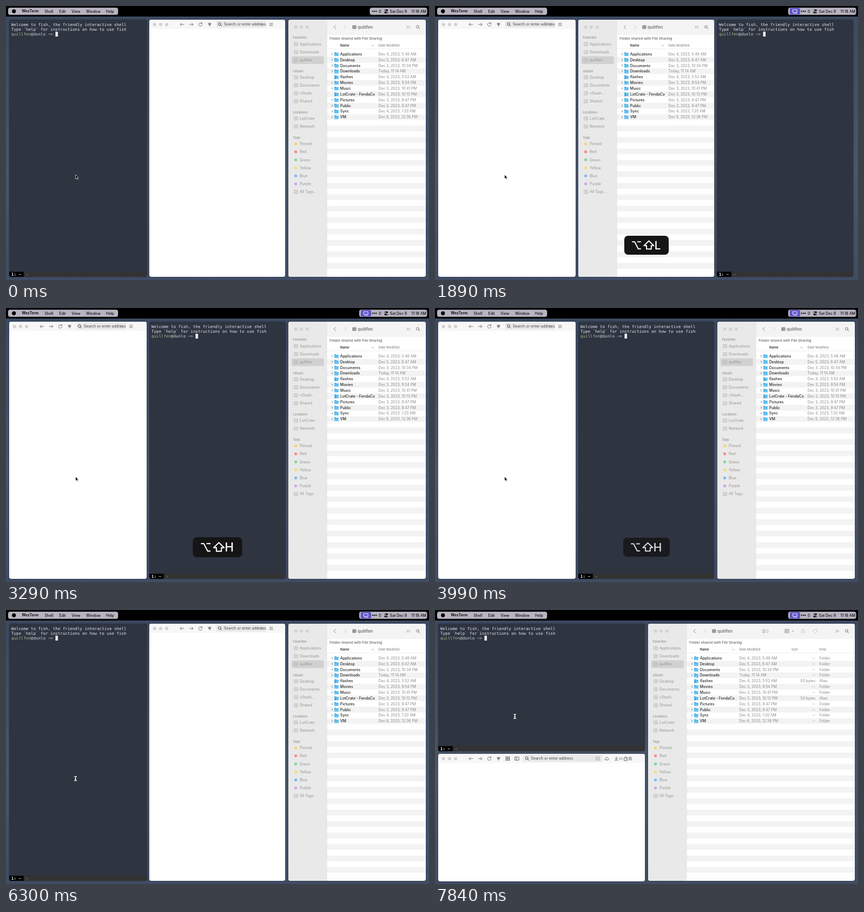
Recreate the animation shown at these times as an HTML page. Size 800 by 520 pixels, loop 8000 ms.

```html
<!DOCTYPE html>
<html lang="en">
<head>
<meta charset="utf-8">
<title>Tiling windows</title>
<style>
html, body { margin: 0; width: 800px; height: 520px; overflow: hidden; }
body { position: relative; background: linear-gradient(#3c4961, #4a566b 60%, #414d65); }
svg { display: block; position: absolute; left: 0; top: 0; }
text { font-family: Inter, "Open Sans", sans-serif; white-space: pre; }
.mono text { font-family: "DejaVu Sans Mono", "Noto Sans Mono", monospace; }
.win { position: absolute; overflow: hidden; border-radius: 4px; box-shadow: 0 0 3px #1a223388; }
#term { background: #2e3440; }
#web, #files { background: #fff; }
.line { fill: none; stroke-width: .9; stroke-linecap: round; stroke-linejoin: round; }
</style>
</head>
<body>
<div class="win" id="files"></div>
<div class="win" id="web"></div>
<div class="win mono" id="term"></div>
<div id="top"></div>
<script>
const $ = id => document.getElementById(id);
const svg = body => `<svg width="800" height="520">${body}</svg>`;
const rect = (x, y, w, h, fill, r = 0) =>
  `<rect x="${x}" y="${y}" width="${w}" height="${h}" rx="${r}" fill="${fill}"/>`;
const dot = (x, y, r, fill) => `<circle cx="${x}" cy="${y}" r="${r}" fill="${fill}"/>`;
const line = (x, y, d, color = '#777') =>
  `<path class="line" transform="translate(${x} ${y})" d="${d}" stroke="${color}"/>`;
// y is the middle of the text line
const text = (x, y, s, size = 7, fill = '#222', weight = 400, anchor = 'start') =>
  `<text x="${x}" y="${y + size * .36}" font-size="${size}" fill="${fill}" font-weight="${weight}" text-anchor="${anchor}">${s}</text>`;
const lights = (xs, y) => xs.map(x => dot(x, y, 3.1, '#d2d2d2')).join('');

const ICON = {
  left: 'M3.5 0H-3.5M-.8 -2.7L-3.5 0L-.8 2.7',
  right: 'M-3.5 0H3.5M.8 -2.7L3.5 0L.8 2.7',
  reload: 'M2.8 -1.8A3.3 3.3 0 1 0 3.3 .5M3 -3.6V-1.5H.9',
  leaf: 'M0 3.5V-1M-3 -2.5L0 0L3 -2.5M-2.5 -.5H2.5M-1 -3L0 -1L1 -3M-1.5 1H1.5',
  search: 'M1.6 1.6L3.5 3.5M2 -.5A2.5 2.5 0 1 1 -3 -.5A2.5 2.5 0 1 1 2 -.5',
  more: 'M-3 -2.3L-.8 0L-3 2.3M.6 -2.3L2.8 0L.6 2.3',
  menu: 'M-3 -2.3H3M-3 0H3M-3 2.3H3',
  panel: 'M-3.7 -3H3.7V3H-3.7ZM-1 -3V3',
  box: 'M-3.2 -3H3.2V3H-3.2ZM-1.5 -1H1.5M-1.5 1H1.5',
  cloud: 'M-2.5 2.5H2.5A1.7 1.7 0 0 0 2.5 -.5A2.6 2.6 0 0 0 -2.5 -.5A1.6 1.6 0 0 0 -2.5 2.5',
  down: 'M0 -3V1.2M-2 -.7L0 1.2L2 -.7M-3 3H3',
  piece: 'M-3 3.3V-1.5H-1V-3.2H1V-1.5H3V0H1.8V1.7H3V3.3Z',
  back: 'M1.6 -3.4L-1.8 0L1.6 3.4',
  fwd: 'M-1.6 -3.4L1.8 0L-1.6 3.4',
  chev: 'M-.8 -1.7L.9 0L-.8 1.7',
  caret: 'M-1.6 .8L0 -.8L1.6 .8',
  list: 'M-5 -2.5H0M-5 0H0M-5 2.5H0M3 -1L4.4 -2.6L5.8 -1M3 1L4.4 2.6L5.8 1',
  share: 'M-2 -1H-3V3.5H3V-1H2M0 1V-4M-1.6 -2.4L0 -4L1.6 -2.4',
  tag: 'M-4 0L-1 -3H3.5V1L.5 4ZM2 -1.5V-1.4'
};
const icon = (name, x, y, color) => line(x, y, ICON[name], color);
const grid = (x, y, fill) => [0, 1, 2].flatMap(i => [0, 1, 2].map(j =>
  rect(x - 4 + i * 3, y - 3.8 + j * 2.8, 2, 1.9, fill))).join('');

// Terminal
$('term').innerHTML = svg(
  ['Welcome to fish, the friendly interactive shell', 'Type `help` for instructions on how to use fish']
    .map((s, i) => text(4, 9.2 + 9 * i, s, 7.69, '#e5e9f0')).join('') +
  text(4, 27.4, '<tspan fill="#a3be8c">quillfen</tspan>@dunlo ~&gt;', 7.69, '#d0d6de') +
  rect(87.5, 22.8, 4.7, 9.2, '#eceff4') +
  `<g id="tabs">${rect(0, -9.7, 800, 10, '#333')}${rect(0, -9.7, 27.5, 10, '#000')}
  ${text(4, -4.8, '1: ~', 7.69, '#eee', 700)}${text(32, -4.8, '+', 7, '#777')}</g>`);

// Browser
const address = (x, w) => `<svg x="${x}" y="2" width="${w}" height="13">${rect(0, 0, w, 13, '#e9e9eb', 2)}
  ${icon('search', 7, 6.7, '#333')}${text(14.5, 6.8, 'Search or enter address', 7, '#444')}</svg>`;
$('web').innerHTML = svg(
  rect(0, 0, 800, 17.5, '#f7f7f8') + lights([10, 21.5, 33], 9.2) +
  ['left', 'right', 'reload', 'leaf'].map((n, i) => icon(n, 62 + 17.4 * i, 9, '#666')).join('') +
  `<g id="webSmall">${address(126.5, 94.5)}${icon('more', 212.5, 9)}${icon('menu', 230.5, 9)}</g>
  <g id="webWide">${grid(131.5, 9, '#444')}${icon('panel', 149, 9, '#555')}${address(161, 150)}
  ${['box', 'cloud', 'down', 'more', 'piece', 'menu'].map((n, i) =>
    icon(n, [302, 319, 337, 345.5, 354.5, 363][i], 9, i ? '#555' : '#aaa')).join('')}</g>`);

// File manager
const names = ['Applications', 'Desktop', 'Documents', 'Downloads', 'flashes', 'Movies', 'Music',
  'LotCrate - FendaCo', 'Pictures', 'Public', 'Sync', 'VM'];
const dates = ['Dec 4, 2023, 5:48 AM', 'Dec 5, 2023, 6:47 AM', 'Dec 3, 2023, 10:34 PM', 'Today, 11:14 AM',
  'Dec 4, 2023, 5:52 AM', 'Dec 3, 2023, 9:54 PM', 'Dec 3, 2023, 10:41 PM', 'Dec 3, 2023, 10:13 PM',
  'Dec 3, 2023, 9:47 PM', 'Dec 3, 2023, 9:47 PM', 'Dec 4, 2023, 1:20 AM', 'Dec 6, 2023, 12:36 PM'];
const bytes = { 4: '83 bytes', 7: '53 bytes' };
const rowY = i => 65.3 + 10.86 * i;
const folder = (x, y) => `<path transform="translate(${x} ${y})" fill="#45aee6" d="M-4 -3.3h3l1 1h4v5.8h-8z"/>` +
  rect(x - 4, y - 1.2, 8, 4.7, '#62c3f2', .6);
const sideGroups = [
  ['Favorites', 34, 46.5, ['Applications', 'Downloads', 'quillfen']],
  ['vStash', 97.5, 109.3, ['Desktop', 'Documents', 'vStash…', 'Shared']],
  ['Locations', 175.5, 187.5, ['LotCrate', 'Network']],
  ['Tags', 223.5, 235.6, ['Pinned', 'Red', 'Green', 'Yellow', 'Blue', 'Purple', 'All Tags…']]
];
const tagColors = ['#f4d16a', '#f98b87', '#7fd895', '#f5dc77', '#78b9f5', '#d0a2e8'];
const sidebar = sideGroups.map(([head, y, first, items], g) => text(8.7, y, head, 5.8, '#999', 600) +
  items.map((s, i) => {
    const iy = first + 15.2 * i;
    return (g == 3 && tagColors[i] ? dot(14, iy, 2.7, tagColors[i]) : icon('box', 14.5, iy, '#b5b5b5')) +
      text(21.5, iy, s, 7, '#959595');
  }).join('')).join('');
let stripes = '', rows = '', dateCol = '', wideCols = '';
for (let i = 1; i < 39; i += 2) stripes += rect(73, rowY(i) - 5.43, 730, 10.86, '#f3f3f4');
names.forEach((s, i) => {
  const y = rowY(i);
  rows += (bytes[i] ? '' : icon('chev', 83, y, '#666')) + folder(91, y) + text(98, y, s, 7, '#222', 500);
  if (bytes[i]) rows += icon('chev', 89, y + 2, '#245');
  dateCol += text(170.5, y, dates[i], 6.9, '#888');
  wideCols += text(316.5, y, bytes[i] || '--', 6.9, '#888', 400, 'end') +
    text(324, y, bytes[i] ? 'Alias' : 'Folder', 6.9, '#888');
});
$('files').innerHTML = svg(
  stripes + rect(73, 0, 730, 29, '#f4f4f4') + rect(73, 54.8, 730, .6, '#e4e4e4') +
  rect(0, 0, 73, 488, '#e9e9e9') + rect(72.6, 0, .6, 488, '#dcdcdc') + lights([14, 24.7, 35.7], 14) +
  rect(6, 69.5, 61.5, 14.8, '#d1d1d1', 3) + sidebar +
  icon('back', 88, 14, '#777') + icon('fwd', 107.5, 14, '#c4c4c4') +
  rect(121, 10.5, 7.5, 7, '#999', 1) + text(131, 14, 'quillfen', 8.1, '#777', 600) +
  text(78, 35.2, 'Folder shared with File Sharing', 6.7, '#777', 600) +
  text(98, 49, 'Name', 6.2, '#333', 600) + rows +
  `<g id="dates">${icon('caret', 159.3, 49, '#888')}${text(170.5, 49, 'Date Modified', 6, '#777')}${dateCol}</g>
  <g id="filesWide">${text(271, 49, 'Size', 6, '#777')}${text(324, 49, 'Kind', 6, '#777')}${wideCols}
  ${icon('list', 221.5, 14, '#888')}${grid(262.5, 14, '#888')}${icon('caret', 274, 14, '#888')}
  ${icon('share', 293, 14, '#c8c8c8')}${icon('tag', 316, 14, '#c8c8c8')}</g>
  <g id="filesEnd">${icon('more', -33, 14, '#888')}${icon('search', -15, 14, '#666')}</g>`);

// Menu bar, key display and pointer
const menus = [['Shell', 73], ['Edit', 100.5], ['View', 124], ['Window', 151.5], ['Help', 189]];
$('top').innerHTML = svg(
  rect(0, 0, 800, 20, '#000') + rect(4, 3.3, 208, 13.4, '#b8b4c0', 4) + dot(15, 10, 3.7, '#000') +
  text(30, 10, 'WezTerm', 6.9, '#111', 700) + menus.map(([s, x]) => text(x, 10, s, 7, '#111', 500)).join('') +
  `<rect id="pill" y="3.3" height="13.4" rx="4" fill="#b8b4c0"/>
  <g id="rec">${rect(0, 3.7, 19.5, 12.6, '#5d55c8', 3)}
  ${line(9.7, 10, 'M-4 -3H4V2H-4ZM-2.5 4H4', '#fff')}</g>
  <g id="dots">${[0, 3.3, 6.6].map(x => dot(x, 10, 1.2, '#111')).join('')}</g>
  <g id="split">${line(702, 10, 'M-3 -3H-.7V3H-3ZM.8 -3H3V3H.8Z', '#222')}</g>` +
  text(705, 10, '0', 7, '#111', 500) + rect(715.5, 6.5, 7, 3, '#111', 1.5) + rect(715.5, 10.7, 7, 3, '#111', 1.5) +
  dot(717.2, 8, .9, '#ccc') + dot(720.8, 12.2, .9, '#ccc') +
  text(726, 10, 'Sat Dec 9', 7, '#111', 500) + text(795, 10, '11:18 AM', 7, '#111', 500, 'end') +
  `<g id="keys"><rect id="plate" y="-18" height="36" rx="7" fill="#151516"/><g id="glyphs">
  <path d="M0 -6.5h5l7 13.5h5M10 -6.5h7M32 -8.2L41.3 .8h-4.8v6.4h-9v-6.4h-4.8z" fill="none" stroke="#fff" stroke-width="2" stroke-linejoin="round"/>
  <text id="key" x="42.5" y="8" font-size="21.5" font-weight="500" fill="#fff"></text></g></g>
  <path id="arrow" d="M0 0V8L1.9 6.4L3.2 9.2L4.6 8.5L3.3 5.9H5.7Z" fill="#000" stroke="#fff" stroke-width=".7"/>
  <g id="beam" class="line"><path id="beamLine" d="M-2 -4Q0 -4 0 -2.6Q0 -4 2 -4M0 -3V3M-2 4Q0 4 0 2.6Q0 4 2 4M-1 1H1" stroke="#fff" stroke-width="1.3"/></g>`);

// Placements: time, x, y, width, height
const places = {
  term: [[0, 6, 26, 261, 488], [1120, 271, 26, 257, 488], [1820, 533, 26, 258, 488], [2030, 534, 26, 260, 488],
    [3290, 271, 26, 258, 488], [3430, 271, 26, 257, 488], [4900, 6, 26, 261, 488], [6580, 6, 26, 391, 242]],
  web: [[0, 271, 26, 257, 488], [1120, 6, 26, 257, 488], [1260, 6, 26, 260, 488],
    [4900, 271, 26, 257, 488], [6580, 6, 273, 391, 242]],
  files: [[0, 534, 26, 260, 488], [1820, 271, 26, 257, 488], [3290, 534, 26, 260, 488],
    [6580, 403, 26, 260, 488], [6720, 403, 26, 391, 488]]
};
// Key presses: time, letter, plate width, fade start, fade end
const presses = [[1120, 'L', 84, 2170, 2450], [1820, 'L', 84, 2170, 2450], [3290, 'H', 88, 3920, 4340],
  [4900, 'H', 88, 5670, 5950], [6580, '/', 84, 7070, 7350]];

const current = (list, t) => list.filter(p => p[0] <= t).pop();
const clamp = v => Math.max(0, Math.min(1, v));
const show = (id, on) => $(id).style.display = on ? '' : 'none';
const move = (id, x, y = 0, extra = '') => $(id).setAttribute('transform', `translate(${x} ${y})${extra}`);

function draw(t) {
  const size = {};
  for (const id in places) {
    const [, x, y, w, h] = current(places[id], t);
    Object.assign($(id).style, { left: x + 'px', top: y + 'px', width: w + 'px', height: h + 'px' });
    size[id] = [w, h];
  }
  move('tabs', 0, size.term[1]);
  const webWide = size.web[0] > 300, filesWide = size.files[0] > 300;
  show('webSmall', !webWide);
  show('webWide', webWide);
  show('filesWide', filesWide);
  move('dates', filesWide ? 2 : 0);
  move('filesEnd', size.files[0]);

  const recording = t >= 210, split = t >= 6580 && t < 6790;
  const pillX = split ? 659 : recording ? 668 : 688;
  $('pill').setAttribute('x', pillX);
  $('pill').setAttribute('width', 796.5 - pillX);
  show('rec', recording);
  show('split', split);
  move('rec', pillX + 3);
  move('dots', split ? 685 : 693.5);

  const press = current(presses, t);
  show('keys', press && t < press[4]);
  if (press) {
    const [start, key, width, fade, end] = press;
    move('keys', 400, 454, ` scale(${t - start < 70 ? 1.06 : 1})`);
    $('keys').setAttribute('opacity', 1 - clamp((t - fade) / (end - fade)));
    $('plate').setAttribute('x', -width / 2);
    $('plate').setAttribute('width', width);
    move('glyphs', 14.5 - width / 2);
    $('key').textContent = key;
  }

  const k = clamp((t - 7420) / 350), ease = k * k * (3 - 2 * k);
  const x = 131.5 + 19.5 * ease, y = 320 - 118 * ease;
  const beam = t >= 4900 && t < 6580 || y < 268;
  show('beam', beam);
  show('arrow', !beam);
  move('beam', x, y);
  move('arrow', x, y);
}

const start = performance.now();
function tick() {
  draw((performance.now() - start) % 8000);
  requestAnimationFrame(tick);
}
tick();
</script>
</body>
</html>
```
